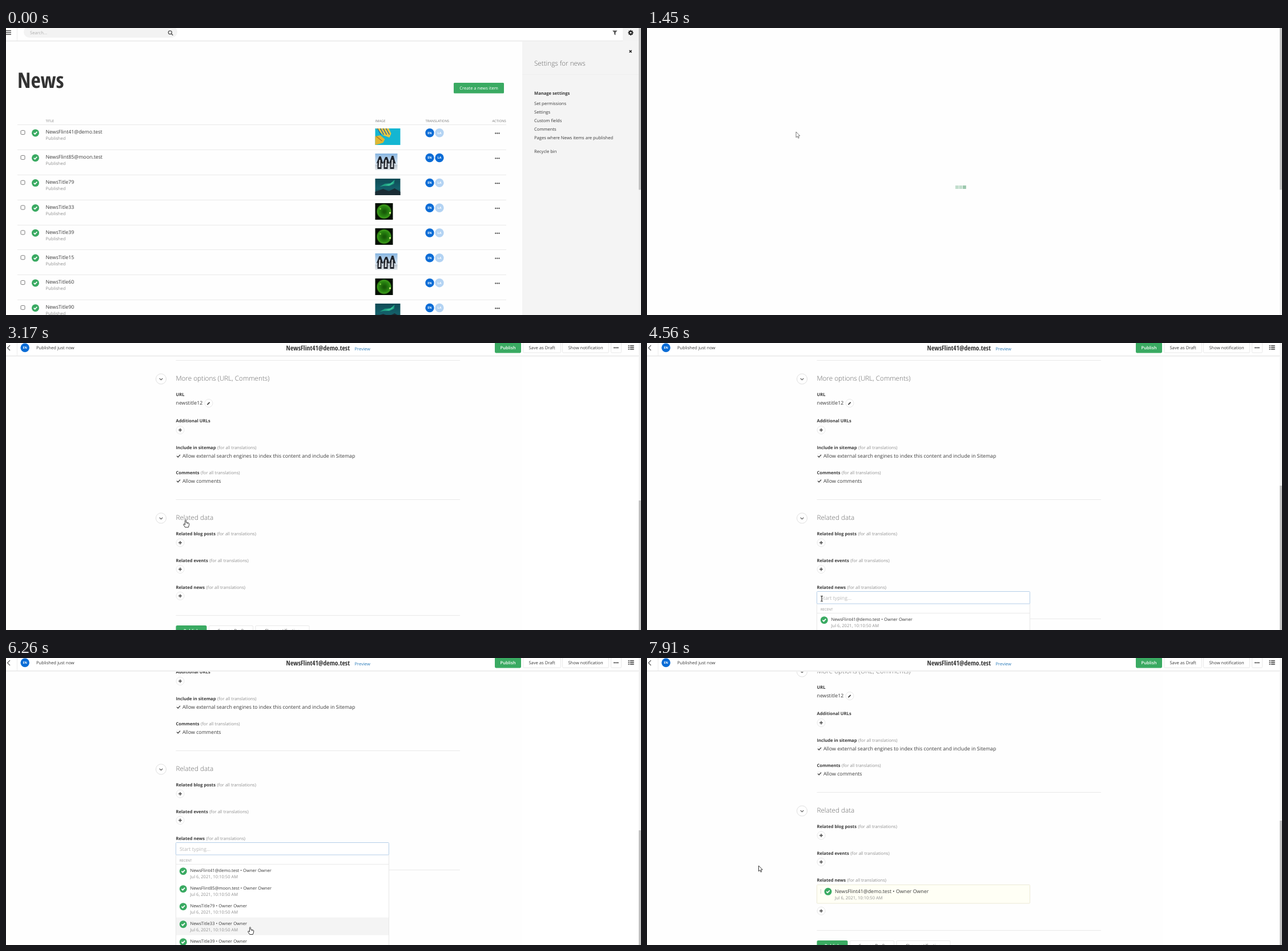
Recreate the animation shown at these times as an HTML page with a canvas. Size 1112 px wide and 503 px high, loop 8000 ms.

```html
<!DOCTYPE html>
<html lang="en">
<head>
<meta charset="utf-8">
<title>News editor</title>
<style>
html, body { margin: 0; width: 100%; height: 100%; overflow: hidden; background: #fff; }
canvas { display: block; width: 1112px; height: 503px; }
</style>
</head>
<body>
<canvas id="stage" width="1112" height="503"></canvas>
<script>
const ctx = document.getElementById('stage').getContext('2d');
const W = 1112, H = 503, LOOP = 8000;
const GREEN = '#3aaa62', BLUE = '#0a6cd6', INK = '#3a3a3a', GREY = '#8f8f8f', RULE = '#e9e9e9', EDGE = '#e8e8e8';
const SANS = '"Open Sans", "Noto Sans", sans-serif';
const NARROW = '"Open Sans Condensed", "Open Sans", "Noto Sans", sans-serif';
const S = 7.6, M = 8.78, L = 11.7, XS = 5.85;
const TITLE = 'NewsFlint41@demo.test', OWNER = 'Owner Owner', DATE = 'Jul 6, 2021, 10:10:50 AM';
const NAMES = [TITLE, 'NewsFlint85@moon.test', 'NewsTitle79', 'NewsTitle33', 'NewsTitle39',
  'NewsTitle15', 'NewsTitle60', 'NewsTitle90'];
const PICTURES = ['reef', 'birds', 'aurora', 'sun', 'sun', 'birds', 'sun', 'aurora'];

const LOADING = 1350, EDITOR = 1850, OPEN = 4110, PICKED = 7250;

// unhinted glyph widths
ctx.textRendering = 'geometricPrecision';

// ---- timing ----
const clamp = (v, a = 0, b = 1) => Math.min(b, Math.max(a, v));
const ease = p => p * p * (3 - 2 * p);

function track(keys, t) {
  let i = 0;
  while (i < keys.length - 1 && keys[i + 1][0] <= t) i++;
  const a = keys[i], b = keys[Math.min(i + 1, keys.length - 1)];
  const p = b === a ? 0 : ease(clamp((t - a[0]) / (b[0] - a[0])));
  return a.slice(1).map((v, k) => typeof v === 'number' ? v + (b[k + 1] - v) * p : v);
}

// time, x, y, kind
const POINTER = [
  [220, 977, 472, 'arrow'], [600, 540, 260, 'arrow'], [880, 262, 168, 'arrow'],
  [1010, 255, 176, 'arrow'], [1070, 255, 176, 'arrow'], [1200, 261, 182, 'arrow'],
  [1860, 261, 182, 'arrow'], [2090, 219, 163.5, 'arrow'], [2720, 219, 163.5, 'arrow'],
  [3080, 314.5, 310, 'hand'], [3260, 314.5, 310, 'hand'], [3400, 317, 289, 'arrow'],
  [3720, 198, 372, 'arrow'], [4000, 305, 446, 'hand'], [OPEN, 306, 448, 'text'],
  [4620, 306, 448, 'text'], [4760, 312, 472, 'hand'], [4890, 318, 482, 'hand'],
  [5850, 318, 482, 'hand'], [6240, 427.5, 471.5, 'hand'], [6290, 427.5, 471.5, 'hand'],
  [6420, 490, 436, 'hand'], [6560, 420, 333, 'text'], [6640, 390, 340, 'text'],
  [6710, 390, 340, 'text'], [6900, 372, 404, 'hand'], [7090, 360, 379, 'hand'],
  [PICKED, 360, 379, 'arrow'], [7580, 190, 372, 'arrow'], [7880, 195.5, 364, 'arrow']
];
const SCROLL = [[2370, -13], [2470, 0], [2510, 0], [2720, 170], [2960, 467],
  [4980, 467], [5300, 523], [5400, 523], [5720, 579]];

// ---- drawing helpers ----
function text(str, x, cy, size = S, color = INK, weight = 400, align = 'left', family = SANS) {
  ctx.font = `${weight} ${size}px ${family}`;
  ctx.textAlign = align;
  ctx.fillStyle = color;
  ctx.fillText(str, x, cy + size * 0.36);
  return ctx.measureText(str).width;
}
function rect(x, y, w, h, color) {
  ctx.fillStyle = color;
  ctx.fillRect(x, y, w, h);
}
function box(x, y, w, h, r, fill, stroke) {
  ctx.beginPath();
  ctx.roundRect(x, y, w, h, r);
  paint(fill, stroke);
}
function paint(fill, stroke, width = 1) {
  if (fill) { ctx.fillStyle = fill; ctx.fill(); }
  if (stroke) { ctx.strokeStyle = stroke; ctx.lineWidth = width; ctx.stroke(); }
}
function disc(x, y, r, fill, stroke) {
  ctx.beginPath();
  ctx.arc(x, y, r, 0, 7);
  paint(fill, stroke);
}
function shape(x, y, pts) {
  ctx.beginPath();
  for (let i = 0; i < pts.length; i += 2) ctx.lineTo(x + pts[i], y + pts[i + 1]);
}
function line(x, y, pts, color, width = 1) {
  shape(x, y, pts);
  paint(null, color, width);
}
function poly(x, y, pts, color) {
  shape(x, y, pts);
  paint(color);
}
const rule = (x, y, w) => rect(x, Math.round(y), w, 1, RULE);

// ---- icons ----
function tick(x, y, color, width = 1.6) {
  line(x, y, [-2.8, 0, -0.8, 2, 2.9, -2], color, width);
}
function status(x, y) {
  disc(x, y, 6.5, GREEN);
  tick(x, y, '#fff', 1.7);
}
function lang(x, y, code, on) {
  disc(x, y, 7.7, on ? BLUE : '#b3d3f3');
  text(code, x, y, 5.4, '#fff', 700, 'center');
}
function dots(x, y) {
  for (const d of [-3.1, 0, 3.1]) disc(x + d, y, 1.2, '#5a5a5a');
}
function plus(y) {
  disc(305, y, 7, '#fff', EDGE);
  rect(302, y - 0.7, 6, 1.4, '#444');
  rect(304.3, y - 3, 1.4, 6, '#444');
}
function chevron(y) {
  disc(271.5, y, 9, '#fff', '#dfdfdf');
  line(271.5, y, [-2.8, -1.2, 0, 1.6, 2.8, -1.2], '#555', 1.1);
}
function gear(x, y) {
  for (let i = 0; i < 8; i++) {
    ctx.save();
    ctx.translate(x, y);
    ctx.rotate(i * Math.PI / 4);
    rect(-1, -4.6, 2, 3, '#222');
    ctx.restore();
  }
  disc(x, y, 3.4, '#222');
  disc(x, y, 1.4, '#f3f3f3');
}

// ---- thumbnails ----
const art = {
  reef(x, y) {
    rect(x, y, 44, 29, '#14b6d2');
    poly(x, y, [0, 14, 9, 12, 17, 19, 14, 25, 8, 27, 0, 29], '#e0b732');
    poly(x, y, [2, 0, 24, 0, 28, 9, 25, 16, 14, 12], '#e9c640');
    for (let i = 0; i < 4; i++) line(x + 6 + i * 5, y, [-2, 0, 4, 11], '#2463a0', 1.4);
    line(x, y, [2, 14, 12, 22], '#a9772b', 1.5);
  },
  birds(x, y) {
    const sky = ctx.createLinearGradient(0, y, 0, y + 29);
    sky.addColorStop(0, '#86b4e0');
    sky.addColorStop(0.65, '#dbe8f3');
    sky.addColorStop(0.7, '#b9c3cd');
    sky.addColorStop(1, '#e6ebef');
    rect(x, y, 39, 29, sky);
    for (const [dx, top] of [[8, 5], [19, 6], [30, 4]]) {
      poly(x + dx, y, [-1, top, 2, top, 4, 11, 6, 18, 3, 17, 3, 27, -4, 27, -4, 16, -6, 18, -3, 10], '#20242c');
      poly(x + dx, y, [-1, 11, 1, 11, 1, 24, -2, 24], '#dfe3e6');
    }
  },
  aurora(x, y) {
    const sky = ctx.createLinearGradient(0, y, 0, y + 29);
    sky.addColorStop(0, '#0f4a55');
    sky.addColorStop(0.6, '#14606a');
    sky.addColorStop(1, '#1c3039');
    rect(x, y, 44, 29, sky);
    poly(x, y, [8, 14, 17, 9, 27, 8, 34, 2, 33, 9, 25, 13, 15, 13], '#1f9f83');
    poly(x, y, [18, 11, 26, 9, 32, 5, 30, 9, 24, 12], '#3cc79a');
    poly(x, y, [0, 23, 14, 18, 24, 22, 34, 17, 44, 23, 44, 29, 0, 29], '#1a2c35');
  },
  sun(x, y) {
    rect(x, y, 31, 29, '#041003');
    const glow = ctx.createRadialGradient(x + 16, y + 15, 2, x + 15.5, y + 14.5, 13.5);
    glow.addColorStop(0, '#175a08');
    glow.addColorStop(0.65, '#2b8a12');
    glow.addColorStop(0.82, '#3f9c1b');
    glow.addColorStop(1, '#041003');
    disc(x + 15.5, y + 14.5, 13.5, glow);
    disc(x + 26, y + 17, 1.6, '#dff08a');
    disc(x + 9, y + 10, 1.4, '#7cc93c');
  }
};

// ---- list page ----
function listPage() {
  rect(0, 22, W, 1, '#e6e6e6');
  rect(0, 23, W, 1, '#f5f5f5');
  for (const y of [4, 7.3, 10.6]) rect(0, y, 9, 1.4, '#444');
  rect(19, 0, 1, 22, '#ececec');
  box(31, -3, 269, 20, 10, '#f3f3f3');
  text('Search...', 42, 8.5, S, '#adadad');
  ctx.beginPath();
  ctx.arc(287.3, 7.8, 3, 0, 7);
  paint(null, '#555', 1.3);
  line(289.5, 10, [0, 0, 2.8, 2.8], '#555', 1.5);
  poly(1062, 4.5, [0, 0, 8.5, 0, 5.4, 3.6, 5.4, 8, 3.1, 6.4, 3.1, 3.6], '#555');

  rect(1080, 0, 28, 23, '#f3f3f3');
  gear(1094, 8.3);
  rect(904, 23, 204, 480, '#f4f4f4');
  rect(904, 81, 204, 1, '#eeeeee');
  line(1093.6, 41, [-2, -2, 2, 2], '#222', 1.5);
  line(1093.6, 41, [-2, 2, 2, -2], '#222', 1.5);
  text('Settings for news', 925, 62, L, '#666', 300);
  text('Manage settings', 925, 114, S, INK, 700);
  [['Set permissions', 132], ['Settings', 147], ['Custom fields', 162], ['Comments', 177.3],
    ['Pages where News items are published', 192.5], ['Recycle bin', 216.5]]
    .forEach(([s, y]) => text(s, 925, y));

  text('News', 20, 91.5, 37.4, '#333', '700 condensed', 'left', NARROW);
  box(784, 96, 88, 18.5, 1.5, GREEN);
  text('Create a news item', 828, 105.2, S, '#fff', 400, 'center');

  [['TITLE', 69.5], ['IMAGE', 646.5], ['TRANSLATIONS', 734.5], ['ACTIONS', 851.5]]
    .forEach(([s, x]) => text(s, x, 162.7, XS, '#777'));
  NAMES.forEach((name, i) => {
    const y = 169.3 + i * 43.83;
    rule(20, y, 856);
    box(26, y + 10.3, 7, 7, 1.5, '#fff', '#777');
    status(51.5, y + 14.6);
    text(name, 69.5, y + 13, M);
    text('Published', 69.5, y + 24.4, S, GREY);
    art[PICTURES[i]](646.5, Math.round(y + 6.7));
    lang(742, y + 14.4, 'EN', true);
    lang(759, y + 14.4, 'LA', i === 1);
    dots(860.5, y + 15.2);
  });
}

function loader(t) {
  const active = Math.floor(Math.min(t, 1630) / 130) % 3;
  for (let i = 0; i < 3; i++)
    rect(540 + i * 6.5, 276, 5.8, 6, i === active ? '#9cc8ad' : '#c2decd');
}

// ---- editor page ----
function label(str, y, hint) {
  const w = text(str, 297.5, y, S, INK, 700);
  if (hint) text('(for all translations)', 297.5 + w + 2.5, y, S, GREY);
}
function section(str, y) {
  rule(297.5, y - 32, 497.5);
  chevron(y + 1);
  text(str, 297.5, y, L, '#666', 300);
}
function option(str, y) {
  box(298.5, y - 3.5, 7, 7, 1, '#fff', '#f0f0f0');
  tick(302, y, '#444', 1.3);
  text(str, 309, y, M);
}
function button(str, x, y, w, main) {
  box(x + 0.5, y + 0.5, w - 1, 17.5, 1.5, main ? GREEN : '#fff', main ? GREEN : EDGE);
  text(str, x + w / 2, y + 9.5, S, main ? '#fff' : INK, main ? 600 : 400, 'center');
}

function upperForm(o) {
  label('Title', o + 19);
  box(297.5, o + 28.5, 497, 20, 1, '#fff', '#e0e0e0');
  text(TITLE, 304, o + 39, M);
  text('21', 800, o + 39, S, '#d9924f');
  label('Content', o + 72.5);
  for (let i = 0; i < 29; i++)
    rect(297.5, Math.round(o + 83 + i * 9.37), i < 28 ? 497.5 : 373, 6, '#f6f6f6');
  rule(297.5, o + 387, 497.5);
  label('Summary', o + 416.5);
  box(297.5, o + 425.5, 373, 46, 1, '#fff', '#e0e0e0');
}

function lowerForm(o, state, mouse) {
  section('More options (URL, Comments)', o + 62);
  label('URL', o + 90);
  text('newstitle12', 297.5, o + 105, M);
  disc(355, o + 105.5, 7, '#fff', EDGE);
  line(353, o + 107.6, [0, 0, 3.6, -3.8], '#444', 1.8);
  poly(352, o + 108.6, [0, 0, 0.3, -2, 1.8, -0.5], '#444');
  label('Additional URLs', o + 136.5);
  plus(o + 152.5);
  label('Include in sitemap', o + 183.5, true);
  option('Allow external search engines to index this content and include in Sitemap', o + 198);
  label('Comments', o + 227.5, true);
  option('Allow comments', o + 241.7);
  section('Related data', o + 306);
  label('Related blog posts', o + 334.5, true);
  plus(o + 350);
  label('Related events', o + 381, true);
  plus(o + 396.5);
  label('Related news', o + 428, true);

  const end = o + { closed: 477, open: 483, picked: 516 }[state];
  rule(297.5, end, 497.5);
  button('Publish', 297.5, end + 18, 54, true);
  button('Save as Draft', 355, end + 18, 78);
  button('Show notification', 436.5, end + 18, 95);

  if (state === 'closed') plus(o + 443.3);
  if (state === 'open') dropdown(o, mouse);
  if (state === 'picked') {
    box(297.5, o + 436.5, 373, 32.5, 1, '#fffff5', '#ece9d6');
    for (const d of [-2.6, 0, 2.6]) rect(303.8, o + 447.5 + d, 1.2, 1.2, '#aaa');
    status(317, o + 448.3);
    text(`${TITLE} • ${OWNER}`, 329, o + 447.7, M);
    text(DATE, 329, o + 458.8, S, GREY);
    plus(o + 482.3);
  }
}

function dropdown(o, mouse) {
  box(297.5, o + 456.5, 373, 300, 1, '#fff', EDGE);
  box(297.5, o + 435.5, 373, 21.5, 1, '#fff', '#b4cee8');
  text('Start typing...', 304, o + 446.8, M, '#b8b8b8');
  text('RECENT', 304, o + 466.6, XS, GREY);
  rule(298, o + 473, 372);
  NAMES.forEach((name, i) => {
    const y = o + 473.7 + i * 31;
    if (mouse.y >= y && mouse.y < y + 31) rect(298, y, 372, 31, '#f4f4f4');
    status(310.3, y + 12);
    text(`${name} • ${OWNER}`, 322.5, y + 10.7);
    text(DATE, 322.5, y + 21.4, S, GREY);
  });
}

function editorHeader() {
  rect(0, 0, W, 22, '#fff');
  rect(0, 22, W, 1, '#e6e6e6');
  rect(0, 23, W, 1, '#f6f6f6');
  line(2.5, 8.5, [4.5, -4.5, 0, 0, 4.5, 4.5], '#555', 1.1);
  rect(19, 0, 1, 22, '#ececec');
  lang(33.2, 8.3, 'EN', true);
  text('Published just now', 53, 8.5);
  text(TITLE, 602, 9, L, '#333', '700 condensed', 'right', NARROW);
  text('Preview', 610.5, 10.3, S, '#2b7bb9');
  button('Publish', 856, -1, 46, true);
  button('Save as Draft', 905, -1, 67);
  button('Show notification', 974, -1, 82);
  button('', 1059, -1, 19);
  dots(1068.3, 8.3);
  for (const y of [4, 7, 10]) {
    rect(1089.5, y, 2.2, 1.8, '#555');
    rect(1092.7, y, 7, 1.8, '#555');
  }
}

function editorPage(t, mouse) {
  const state = t < OPEN ? 'closed' : t < PICKED ? 'open' : 'picked';
  const s = state === 'picked' ? 506 : track(SCROLL, t)[0];
  upperForm(-s);
  lowerForm(467 - s, state, mouse);
  editorHeader();
  if (state === 'closed') scrollbar(-16 + (s + 13) * 292 / 480, 236);
  else if (state === 'open') scrollbar(250 + (s - 467) * 0.464, 270);
  else scrollbar(285, 236);
}

function scrollbar(top, size) {
  rect(1108, 0, 4, H, '#f1f1f1');
  rect(1108, top, 4, size, '#c1c1c1');
}

// ---- pointer ----
const cursors = {
  arrow(x, y) {
    shape(x, y, [0, 0, 0, 9.8, 2.2, 7.8, 3.8, 11.2, 5.3, 10.5, 3.8, 7.2, 6.8, 7]);
    ctx.closePath();
    paint('#fff', '#222', 0.9);
  },
  hand(x, y) {
    shape(x, y, [-1, 0.8, 0, 0, 1, 0.8, 1, 4.4, 5.4, 5.4, 6.3, 6.4, 6, 9.6, 4.8, 13, -0.8, 13, -3.6, 8.6, -3.4, 7.2, -2.2, 7.3, -1, 8.6]);
    ctx.closePath();
    paint('#fff', '#222', 0.9);
    for (const d of [2.3, 4]) line(x + d, y, [0, 5, 0, 7], '#222', 0.6);
  },
  text(x, y) {
    rect(x - 0.5, y - 4.5, 1, 9, '#222');
    rect(x - 2, y - 5, 4, 0.9, '#222');
    rect(x - 2, y + 4.1, 4, 0.9, '#222');
  }
};

function draw(t) {
  const [x, y, kind] = track(POINTER, t);
  rect(0, 0, W, H, '#fff');
  if (t < EDITOR) {
    rect(0, 24, 904, 479, '#fefefe');
    listPage();
    if (t >= LOADING) {
      ctx.globalAlpha = clamp(0.6 + (t - LOADING) / 200);
      rect(0, 0, W, H, '#fefefe');
      ctx.globalAlpha = 1;
      loader(t);
    }
    scrollbar(-10, 293.5);
  } else {
    rect(0, 0, 904, H, '#fefefe');
    editorPage(t, { x, y });
  }
  if (t >= POINTER[0][0]) {
    ctx.globalAlpha = t >= LOADING && t < EDITOR ? 0.65 : 1;
    cursors[kind](x, y);
    ctx.globalAlpha = 1;
  }
}

function tickFrame() {
  draw(performance.now() % LOOP);
  requestAnimationFrame(tickFrame);
}
tickFrame();
</script>
</body>
</html>
```
